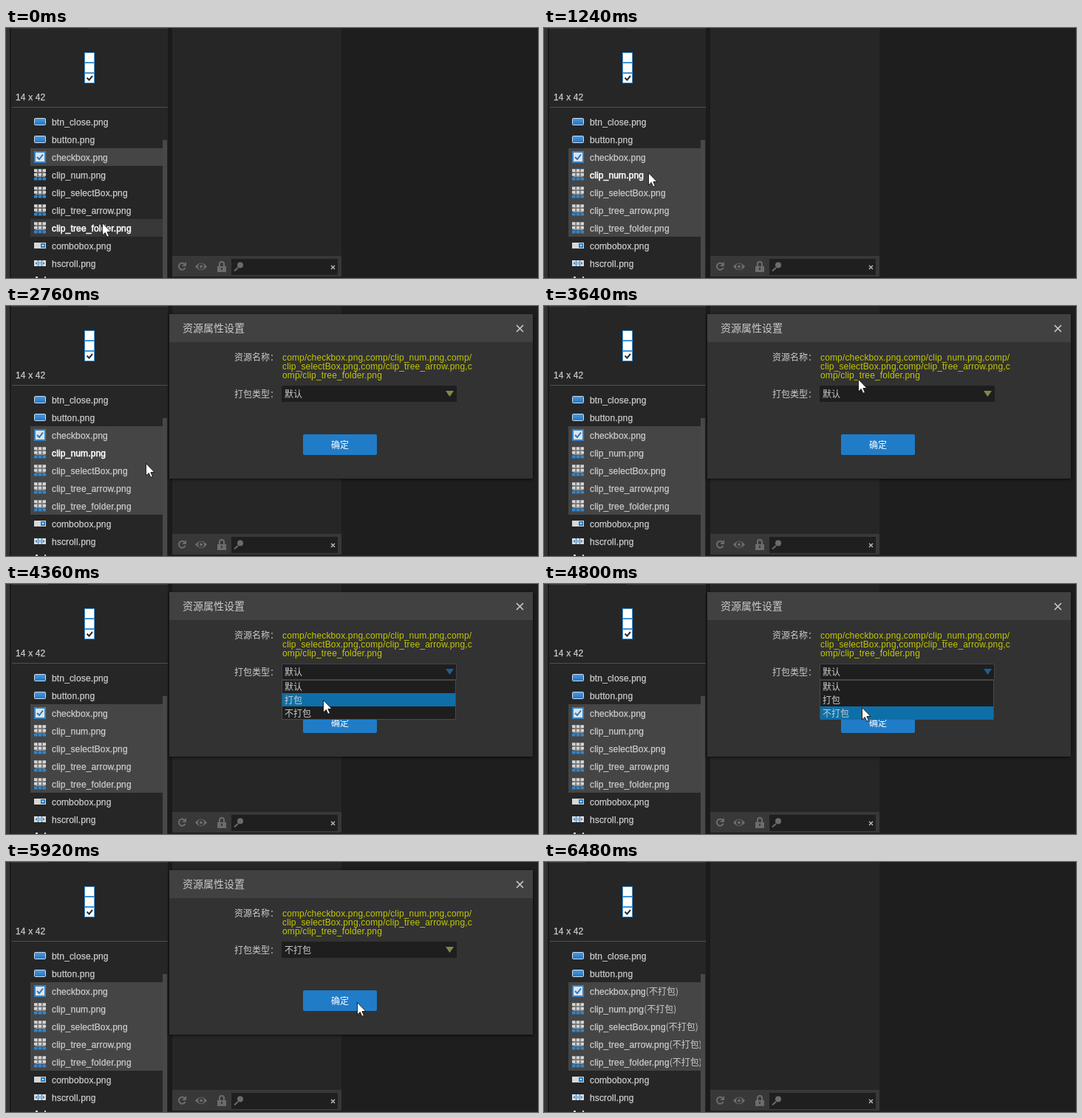
An HTML page for the animation above (7400 ms loop, 720x339 px).

```html
<!DOCTYPE html>
<html lang="zh-CN">
<head>
<meta charset="utf-8">
<title>Resource settings</title>
<style>
  html, body { margin: 0; width: 100%; height: 100%; overflow: hidden; background: #1e1e1e; }
  svg { display: block; width: 720px; height: 339px; }
  text {
    font: 12px "Liberation Sans", Arial, "Noto Sans CJK SC", "Noto Sans CJK", sans-serif;
    letter-spacing: .15px; fill: #ccc; white-space: pre;
  }
  .cjk { font-family: "Noto Sans CJK SC", "Noto Sans CJK", sans-serif; letter-spacing: 0; }
  .label { stroke: #ccc; stroke-width: .25px; }
  .hover .label { fill: #fff; stroke: #fff; stroke-width: .55px; }
  .back { fill: none; }
  .hover .back { fill: #383838; }
  .selected .back { fill: #454545; }
  .paths text { fill: #c4c800; }
  .menu text { fill: #222; }
</style>
</head>
<body>
<svg viewBox="0 0 720 339">
  <defs>
    <linearGradient id="blue" x2="0" y2="1">
      <stop stop-color="#4a9be0"/><stop offset="1" stop-color="#1f74c4"/>
    </linearGradient>
    <filter id="shadow" x="-10%" y="-10%" width="120%" height="125%">
      <feDropShadow dx="0" dy="1" stdDeviation="2.5" flood-opacity=".7"/>
    </filter>
    <clipPath id="listClip"><path d="M33 108H212V339H33Z"/></clipPath>

    <g id="button">
      <rect x=".5" y="3.5" width="15" height="9" rx="1" fill="url(#blue)" stroke="#d5dce4"/>
    </g>
    <g id="checkbox">
      <path fill="#3584c8" d="M0 0H16V16H0Z"/>
      <path fill="#dce3ea" d="M2 2H14V14H2Z"/>
      <path fill="none" stroke="#2f78b8" stroke-width="2" d="M4 8L7 11 12 4.5"/>
    </g>
    <g id="clip">
      <path fill="none" stroke="#d4d4d4" stroke-width="4" stroke-dasharray="4.6 1.1" d="M0 2.2H16M0 7.8H16"/>
      <path fill="none" stroke="#999" d="M2 4.9H15M2 10.4H15"/>
      <path fill="none" stroke="#2f86d0" stroke-width="4" stroke-dasharray="4.6 1.1" d="M0 13.4H16"/>
    </g>
    <g id="combobox">
      <path fill="#d8d8d8" d="M0 4H16V12H0Z"/>
      <path fill="#2c7cc2" d="M9 5H15V11H9Z"/>
      <path fill="#fff" d="M10.5 7H13.5L12 9.5Z"/>
    </g>
    <g id="hscroll">
      <path fill="#d8dde2" d="M0 4H16V12H0Z"/>
      <path fill="#2c7cc2" d="M4 6V10L1.5 8ZM12 6V10L14.5 8ZM5 4H6V12H5ZM10 4H11V12H10ZM7.5 6H8.5V10H7.5Z"/>
    </g>
  </defs>

  <!-- panels -->
  <path fill="#1e1e1e" d="M0 0H720V339H0Z"/>
  <path fill="#333" d="M0 0H5V339H0Z"/>
  <path fill="#1b1b1b" d="M5 0H7V339H5ZM219 0H225V339H219Z"/>
  <path fill="#262626" d="M7 0H219V339H7ZM225 0H454V309H225Z"/>
  <path fill="#3c3c3c" d="M7 0H56V1H7ZM112 0H219V1H112Z"/>
  <path fill="#505050" d="M8 107H219V108H8Z"/>
  <path fill="#484848" d="M212 152H218V339H212Z"/>
  <path fill="#241d20" d="M225 337H720V339H225Z"/>

  <!-- preview -->
  <path fill="#3b93d8" d="M106 33H120V75H106Z"/>
  <path fill="#fff" d="M107 34H119V46H107ZM107 48H119V60H107ZM107 62H119V74H107Z"/>
  <path fill="none" stroke="#2b2b2b" stroke-width="2" d="M109.5 67.5L112.5 70.5 117 65"/>
  <text class="label" x="13" y="98">14 x 42</text>

  <g id="list" clip-path="url(#listClip)"></g>
  <path fill="#ccc" d="M40 337H43V339H40ZM52 337H54V339H52Z"/>

  <!-- search bar -->
  <path fill="#383838" d="M225 309H454V337H225Z"/>
  <path fill="#1f1f1f" d="M305 313H449V335H305Z"/>
  <g fill="none" stroke="#6c6c6c" stroke-width="2">
    <path d="M242 320.5A4.5 4.5 0 1 0 242.6 325"/>
    <path stroke="none" fill="#6c6c6c" d="M244 317V323H238Z"/>
    <path stroke="none" fill="#6c6c6c" d="M256 323.5Q264 314 272 323.5Q264 333 256 323.5Z"/>
    <circle cx="264" cy="323.5" r="3" stroke="#383838" fill="#6c6c6c"/>
    <path d="M289 323V320A3 3 0 0 1 295 320V323"/>
    <path stroke="none" fill="#6c6c6c" d="M286 323H298V331H286Z"/>
    <path stroke="#383838" d="M292 325V328"/>
    <path d="M314 325L309 329.5"/>
    <circle cx="317" cy="321.5" r="3" fill="#6c6c6c"/>
    <path stroke="#bbb" stroke-width="1.4" d="M440 322L445 327M445 322L440 327"/>
  </g>

  <g id="menu" class="menu">
    <path fill="#fff" stroke="#bbb" filter="url(#shadow)" d="M140.5 196.5H261.5V249.5H140.5Z"/>
    <path id="menuMark" fill="#ebebeb" d="M142 199H260V223H142Z"/>
    <text class="cjk" x="166" y="216">设置默认属性</text>
    <text class="cjk" x="166" y="240">删除</text>
  </g>

  <g id="dialog">
    <path fill="#303030" filter="url(#shadow)" d="M221 11H713V234H221Z"/>
    <path fill="#414141" d="M221 11H713V49H221Z"/>
    <text class="cjk" x="239" y="35" style="font-size:14px">资源属性设置</text>
    <path stroke="#ccc" stroke-width="1.6" d="M691 26L700 35M700 26L691 35"/>
    <text class="cjk" x="309" y="74">资源名称：</text>
    <text class="cjk" x="309" y="124">打包类型：</text>
    <g class="paths">
      <text x="374" y="74">comp/checkbox.png,comp/clip_num.png,comp/</text>
      <text x="374" y="86">clip_selectBox.png,comp/clip_tree_arrow.png,c</text>
      <text x="374" y="98">omp/clip_tree_folder.png</text>
    </g>
    <path id="combo" fill="#1e1e1e" d="M373.5 108.5H609.5V129.5H373.5Z"/>
    <path id="arrow" d="M595 115H606L600.5 123Z"/>
    <text id="value" class="cjk" x="377" y="124"></text>
    <rect x="402" y="174" width="100" height="28" rx="2" fill="#217cc8"/>
    <text class="cjk" x="440" y="193" style="fill:#fff">确定</text>
    <g id="options">
      <path fill="#1e1e1e" stroke="#4a4a4a" d="M373.5 130.5H608.5V183.5H373.5Z"/>
      <rect id="optionMark" x="374" width="234" height="18" fill="#0e6fa8"/>
    </g>
  </g>

  <path id="cursor" fill="#fff" stroke="#111" stroke-width=".9"
        d="M.5 .5V17L4.3 13.5 6.8 19.3 9.4 18.2 6.9 12.5H12Z"/>
</svg>

<script>
const LOOP = 7400, STEP = 40;
const ROW_TOP = 115, ROW_HEIGHT = 24;
const OPTION_TOP = 130, OPTION_HEIGHT = 18;
const PACKED = [2, 6];   // first and last row of the selection
const FILES = [
  ['button', 'btn_close'], ['button', 'button'], ['checkbox', 'checkbox'],
  ['clip', 'clip_num'], ['clip', 'clip_selectBox'], ['clip', 'clip_tree_arrow'],
  ['clip', 'clip_tree_folder'], ['combobox', 'combobox'], ['hscroll', 'hscroll']
];
const OPTIONS = ['默认', '打包', '不打包'];

// time, x, y of the pointer tip
const POINTER = [
  [0, 130, 264], [960, 130, 264], [1240, 141, 196], [1880, 141, 196],
  [2080, 173, 215], [2400, 189, 213], [2840, 189, 213], [3000, 216, 211],
  [3120, 216, 211], [3600, 425, 97], [3880, 432, 125], [4160, 432, 125],
  [4360, 429, 157], [4520, 430, 165], [4680, 430, 165], [5000, 430, 170],
  [5320, 430, 170], [5880, 475, 190], [6240, 475, 190], [6440, 608, 325]
];

const $ = id => document.getElementById(id);
const show = (node, on) => node.setAttribute('visibility', on ? 'visible' : 'hidden');
const within = (t, from, to) => t >= from && t < to;

const rows = FILES.map(([icon, name], i) => {
  const y = ROW_TOP + i * ROW_HEIGHT;
  $('list').insertAdjacentHTML('beforeend', `<g>
    <rect class="back" x="33" y="${y + (i > 2 ? 0 : 0)}" width="179" height="${ROW_HEIGHT}"/>
    <use href="#${icon}" x="38" y="${y + 4}"/>
    <text class="label" x="62" y="${y + 17}">${name}.png<tspan class="cjk" stroke="none"></tspan></text>
  </g>`);
  const node = $('list').lastElementChild;
  return { node, note: node.querySelector('tspan') };
});

OPTIONS.forEach((name, i) => $('options').insertAdjacentHTML('beforeend',
  `<text class="cjk" x="377" y="${OPTION_TOP + 14 + i * OPTION_HEIGHT}">${name}</text>`));

function pointerAt(t) {
  const next = POINTER.findIndex(key => key[0] > t);
  if (next < 0) return POINTER.at(-1).slice(1);
  const [t0, x0, y0] = POINTER[next - 1], [t1, x1, y1] = POINTER[next];
  const u = (t - t0) / (t1 - t0), k = u * u * (3 - 2 * u);
  return [x0 + (x1 - x0) * k, y0 + (y1 - y0) * k].map(Math.round);
}

function hoveredRow(t, x, y) {
  if (within(t, 1880, 2880)) return 3;
  return t < 6480 && x < 212 ? Math.floor((y - ROW_TOP) / ROW_HEIGHT) : -1;
}

function drawList(t, x, y) {
  const hovered = hoveredRow(t, x, y);
  const last = t < 720 ? PACKED[0] : PACKED[1];
  rows.forEach(({ node, note }, i) => {
    node.classList.toggle('hover', i === hovered);
    node.classList.toggle('selected', i >= PACKED[0] && i <= last);
    note.textContent = t >= 6040 && i >= PACKED[0] && i <= PACKED[1] ? '(不打包)' : '';
  });
}

function drawDialog(t, x, y) {
  const visible = within(t, 2760, 6000), open = within(t, 4200, 5320);
  const active = open || (x > 373 && x < 610 && y > 108 && y < 130);
  show($('dialog'), visible);
  show($('options'), visible && open);
  $('combo').setAttribute('stroke', active ? '#3b444c' : '#1e1e1e');
  $('arrow').setAttribute('fill', active ? '#1b5f97' : within(t, 5320, 5440) ? '#47653c' : '#85854c');
  $('value').textContent = OPTIONS[t < 5320 ? 0 : 2];
  const option = Math.max(0, Math.min(2, Math.floor((y - OPTION_TOP) / OPTION_HEIGHT)));
  $('optionMark').setAttribute('y', OPTION_TOP + option * OPTION_HEIGHT);
}

function draw(now) {
  const t = Math.floor(now % LOOP / STEP) * STEP;
  const [x, y] = pointerAt(t);
  drawList(t, x, y);
  drawDialog(t, x, y);
  const menuOpen = within(t, 1880, 2720);
  show($('menu'), menuOpen);
  show($('menuMark'), menuOpen && y >= 199 && y < 223);
  show($('cursor'), t < 6480);
  $('cursor').setAttribute('transform', `translate(${x} ${y})`);
}

const start = performance.now();
function tick() {
  draw(performance.now() - start);
  requestAnimationFrame(tick);
}
tick();
</script>
</body>
</html>
```
